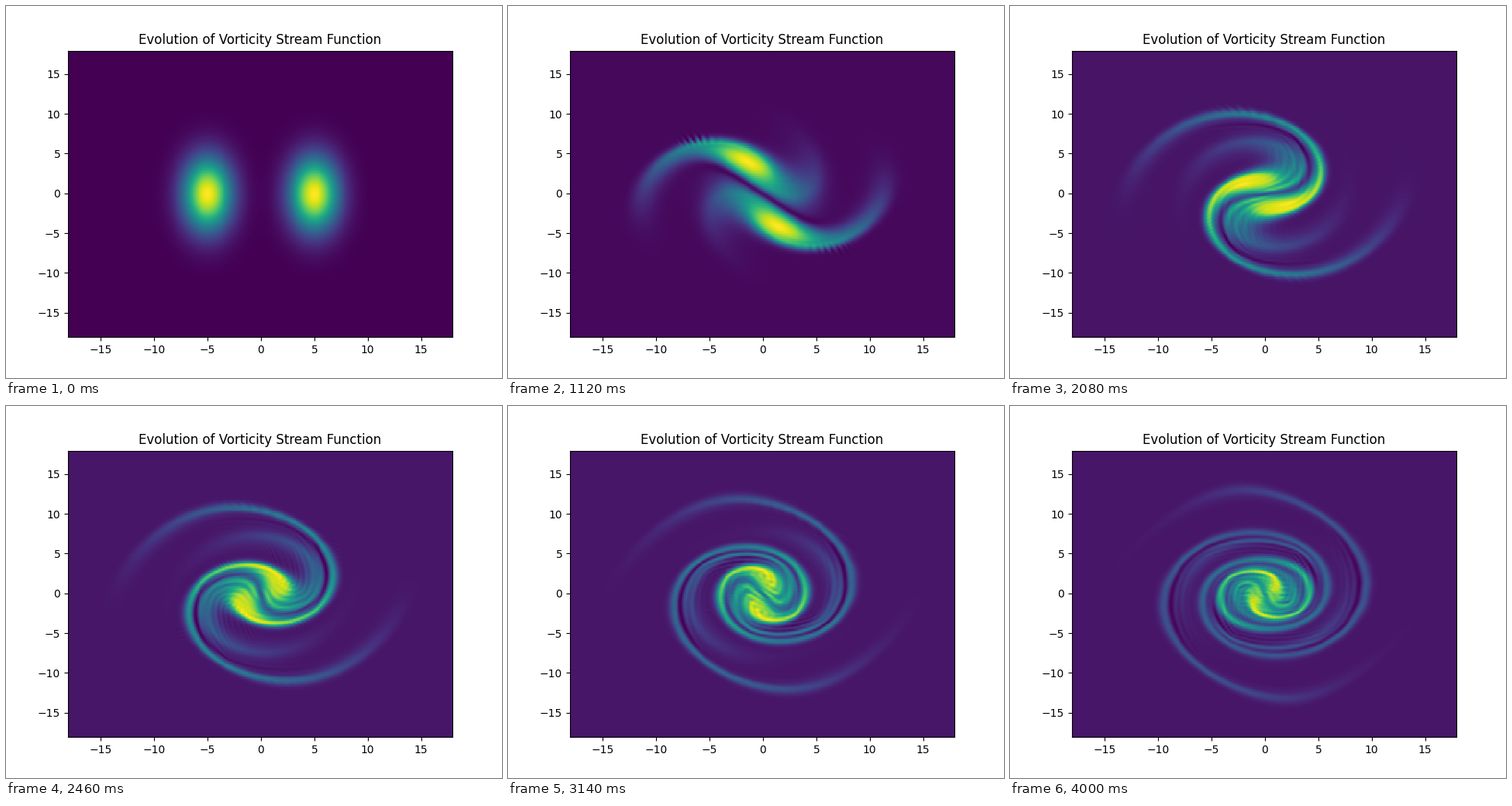
These frames come from a looping animation (640 px wide and 480 px high, 4.02 s). A matplotlib script:

```python
import numpy as np
import matplotlib.pyplot as plt
from matplotlib.animation import FuncAnimation

HALF, N = 18, 256
FRAMES, T_END = 201, 50
NU = 0.001
RTOL, ATOL, MIN_STEP = 1e-3, 1e-6, 0.08

x = np.linspace(-HALF, HALF, N, endpoint=False)
dx = x[1] - x[0]
X, Y = np.meshgrid(x, x)
times = np.linspace(0, T_END, FRAMES)

kx = 2 * np.pi * np.fft.rfftfreq(N, dx)
ky = 2 * np.pi * np.fft.fftfreq(N, dx)
k2 = kx[None, :] ** 2 + ky[:, None] ** 2
k2[0, 0] = 1
inv_lap = -1 / k2
inv_lap[0, 0] = 0

# Dormand-Prince 5(4) weights
STAGES = [np.array(row) for row in (
    [1 / 5],
    [3 / 40, 9 / 40],
    [44 / 45, -56 / 15, 32 / 9],
    [19372 / 6561, -25360 / 2187, 64448 / 6561, -212 / 729],
    [9017 / 3168, -355 / 33, 46732 / 5247, 49 / 176, -5103 / 18656],
    [35 / 384, 0, 500 / 1113, 125 / 192, -2187 / 6784, 11 / 84],
)]
ERROR = np.array([-71 / 57600, 0, 71 / 16695, -71 / 1920,
                  17253 / 339200, -22 / 525, 1 / 40])


def neighbours(f):
    """Periodic east, west, north and south neighbours, as views."""
    p = np.empty((N + 2, N + 2))
    p[1:-1, 1:-1] = f
    p[0, 1:-1], p[-1, 1:-1] = f[-1], f[0]
    p[1:-1, 0], p[1:-1, -1] = f[:, -1], f[:, 0]
    return p[1:-1, 2:], p[1:-1, :-2], p[2:, 1:-1], p[:-2, 1:-1]


def rhs(w):
    """Central-difference vorticity equation, stream function by FFT."""
    psi = np.fft.irfft2(np.fft.rfft2(w) * inv_lap, s=w.shape)
    pe, pw, pn, ps = neighbours(psi)
    we, ww, wn, ws = neighbours(w)
    jac = (pe - pw) * (wn - ws) - (pn - ps) * (we - ww)
    lap = we + ww + wn + ws - 4 * w
    return (NU * lap - jac / 4) / dx ** 2


def hermite(s, h, w0, w1, f0, f1):
    """Cubic between two solver steps, s from 0 to 1."""
    r = 1 - s
    return (r * r * (1 + 2 * s) * w0 + s * s * (3 - 2 * s) * w1
            + h * s * r * (r * f0 - s * f1))


def vortex(cx):
    return np.exp(-(X - cx) ** 2 / 5 - Y ** 2 / 20)


def simulate():
    w = vortex(-5) + vortex(5)
    states = [w.astype(np.float32)]
    k = np.empty((7, N, N))
    k[0] = rhs(w)
    t, h = 0, MIN_STEP
    while len(states) < FRAMES:
        for i, row in enumerate(STAGES, 1):
            new = w + h * np.tensordot(row, k[:i], 1)
            k[i] = rhs(new)
        scale = ATOL + RTOL * np.maximum(abs(w), abs(new))
        miss = h * np.tensordot(ERROR, k, 1) / scale
        err = np.sqrt(np.mean(miss ** 2))
        factor = np.clip(0.9 * err ** -0.2, 0.2, 10)
        if err < 1 or h <= MIN_STEP:
            while len(states) < FRAMES and times[len(states)] <= t + h:
                s = (times[len(states)] - t) / h
                state = hermite(s, h, w, new, k[0], k[6])
                states.append(state.astype(np.float32))
            t, w = t + h, new
            k[0] = k[6]
        h = max(h * factor, MIN_STEP)
    return states


def color_limits(i):
    """Colour range: the undershoot beside the filaments grows, then levels off."""
    peak = float(states[i].max())
    under = np.interp(times[i], [8, 14, 21, 31], [0, 0.021, 0.05, 0.063])
    return -under * peak, peak


states = simulate()

fig, ax = plt.subplots(figsize=(6.4, 4.8), dpi=100)
lo, hi = x[0] - dx / 2, x[-1] + dx / 2
image = ax.imshow(states[0], extent=[lo, hi, lo, hi], aspect="auto",
                  cmap="viridis", interpolation="nearest")
ax.set_title("Evolution of Vorticity Stream Function")


def update(i):
    image.set_data(states[i])
    image.set_clim(*color_limits(i))
    return [image]


anim = FuncAnimation(fig, update, frames=FRAMES, interval=20, repeat=True)
plt.show()
```
